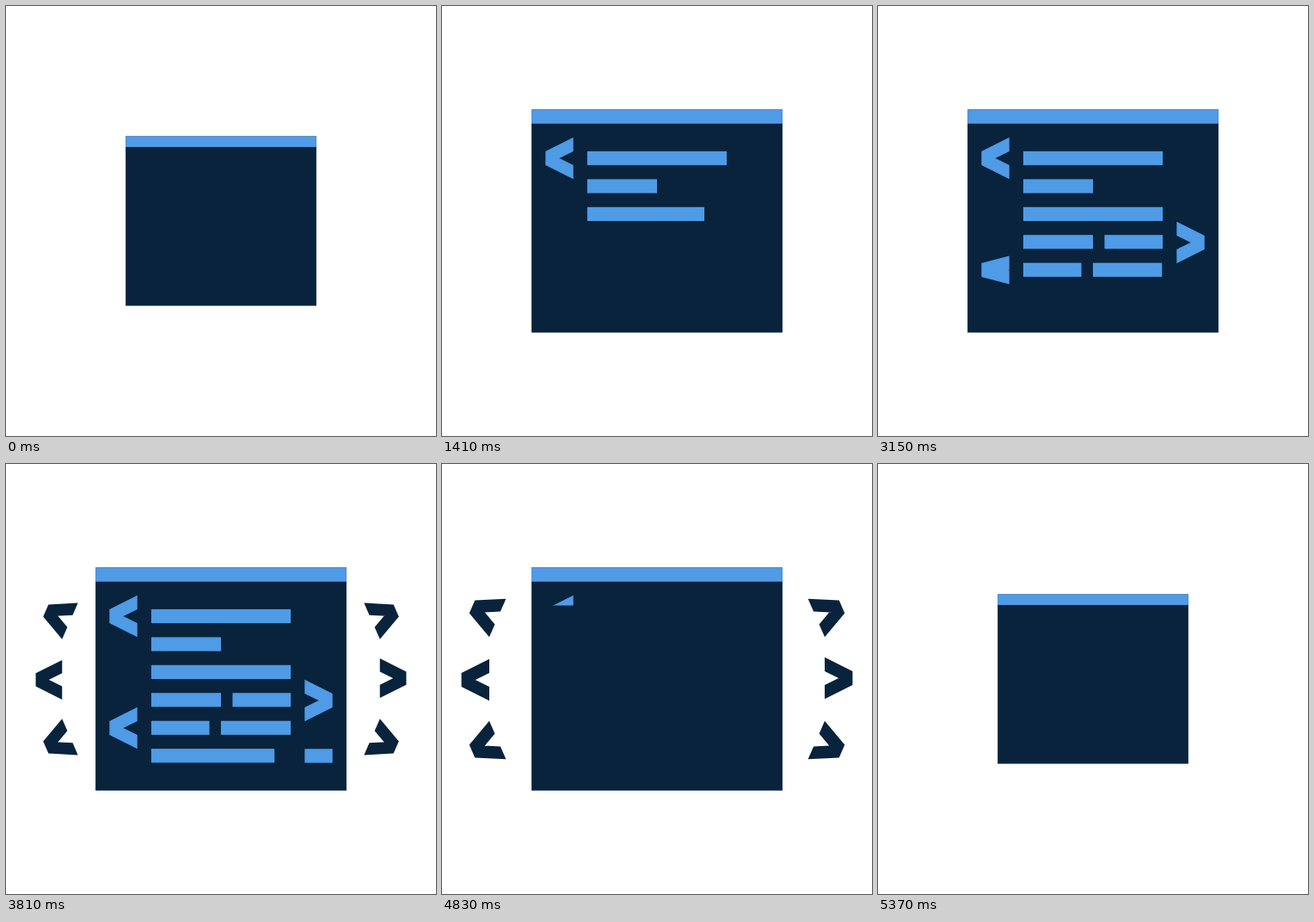
These frames come from a looping animation (500x500 px, 5430 ms). An HTML page:

```html
<!DOCTYPE html>
<html lang="en">
<head>
<meta charset="utf-8">
<title>Code window</title>
<style>
  html, body { margin: 0; width: 100%; height: 100%; overflow: hidden; background: #fff; }
  svg { display: block; width: 100%; height: 100%; }
</style>
</head>
<body>
<svg viewBox="0 0 500 500">
  <defs>
    <clipPath id="wipe"><rect id="wipeRect" x="100" y="130" width="300" height="250"/></clipPath>
  </defs>
  <g id="sides" fill="#09233d"></g>
  <g id="panel">
    <rect x="104.1" y="120.3" width="291.8" height="259.4" fill="#09233d"/>
    <rect x="104.1" y="120.3" width="291.8" height="16.5" fill="#4f9be6"/>
    <g id="code" fill="#4f9be6" clip-path="url(#wipe)"></g>
  </g>
</svg>
<script>
const LOOP = 5430;
const UNIT = 16.2;
const byId = id => document.getElementById(id);

const progress = (t, start, length) => Math.min(1, Math.max(0, (t - start) / length));
const quintInOut = u => u < 0.5 ? 16 * u ** 5 : 1 - 16 * (1 - u) ** 5;
const sineInOut = u => (1 - Math.cos(Math.PI * u)) / 2;
const cubicOut = u => 1 - (1 - u) ** 3;
const ease = (t, start, length) => quintInOut(progress(t, start, length));

function add(parent, tag, attrs) {
  const node = document.createElementNS('http://www.w3.org/2000/svg', tag);
  for (const name in attrs) node.setAttribute(name, attrs[name]);
  return parent.appendChild(node);
}

// Two bars sharing a left end, skewed apart: 0 is a flat bar, 1 a full "<".
function chevronPath(open) {
  const h = UNIT / 2;
  const w = UNIT * 2;
  const arm = d => `M0 ${-h}L${w} ${d - h}V${d + h}L0 ${h}Z`;
  return arm(-UNIT * open) + arm(UNIT * open);
}

const bars = [
  { x: 168.9, y: 168.9, w: 162.2, start: 0, length: 600 },
  { x: 168.9, y: 201.4, w: 81.1, start: 600, length: 450 },
  { x: 168.9, y: 233.8, w: 162.2, start: 1050, length: 600 },
  { x: 168.9, y: 266.2, w: 81.1, start: 1500, length: 520 },
  { x: 263.4, y: 266.2, w: 67.7, start: 2020, length: 300 },
  { x: 168.9, y: 298.7, w: 67.6, start: 2400, length: 520 },
  { x: 249.9, y: 298.7, w: 81.2, start: 2920, length: 300 },
  { x: 168.9, y: 331.1, w: 162.2, start: 3300, length: 816 }
];
const chevrons = [
  { x: 136.5, y: 177, dir: 1, start: 0, grow: 300 },
  { x: 363.5, y: 275, dir: -1, start: 1500, grow: 600 },
  { x: 136.5, y: 307, dir: 1, start: 2400, grow: 600 },
  { x: 363.5, y: 339.4, dir: -1, start: 3300, grow: 600 }
];
for (const b of bars) b.node = add(byId('code'), 'rect', { x: b.x, y: b.y, height: UNIT });
for (const c of chevrons) c.node = add(byId('code'), 'path', {});

for (const turn of [0, 180]) {
  add(byId('sides'), 'path', {
    d: chevronPath(1), transform: `rotate(${turn}) translate(-227.4 1)`
  });
}
for (const sx of [1, -1]) for (const sy of [1, -1]) {
  add(byId('sides'), 'path', {
    d: chevronPath(1), transform: `scale(${sx} ${sy}) translate(-215 -84) rotate(23.6)`
  });
}

const scaleAtCenter = s => `translate(250 250) scale(${s})`;

function draw(t) {
  const leave = sineInOut(progress(t, 5040, 330));
  const enter = sineInOut(progress(t, 0, 690));
  const size = 0.76 + 0.24 * (enter - leave);
  byId('panel').setAttribute('transform', `${scaleAtCenter(size)} translate(-250 -250)`);

  const reach = ease(t, 3300, 750) * (1 - leave);
  byId('sides').setAttribute('transform', scaleAtCenter(reach));
  byId('sides').setAttribute('visibility', reach > 0.01 ? 'visible' : 'hidden');

  for (const b of bars) b.node.setAttribute('width', b.w * ease(t, b.start, b.length));
  for (const c of chevrons) {
    const width = ease(t, c.start, c.grow);
    const open = ease(t, c.start + c.grow, 300);
    c.node.setAttribute('d', width > 0.002 ? chevronPath(open) : '');
    c.node.setAttribute('transform',
      `translate(${c.x} ${c.y}) scale(${c.dir * width} 1) translate(${-UNIT} 0)`);
  }

  const bottom = 380 - 227.6 * cubicOut(progress(t, 4500, 530));
  byId('wipeRect').setAttribute('height', bottom - 130);
  byId('code').setAttribute('visibility', t < 5030 ? 'visible' : 'hidden');
}

const begin = performance.now();
function frame() {
  draw((performance.now() - begin) % LOOP);
  requestAnimationFrame(frame);
}
draw(0);
requestAnimationFrame(frame);
</script>
</body>
</html>
```
